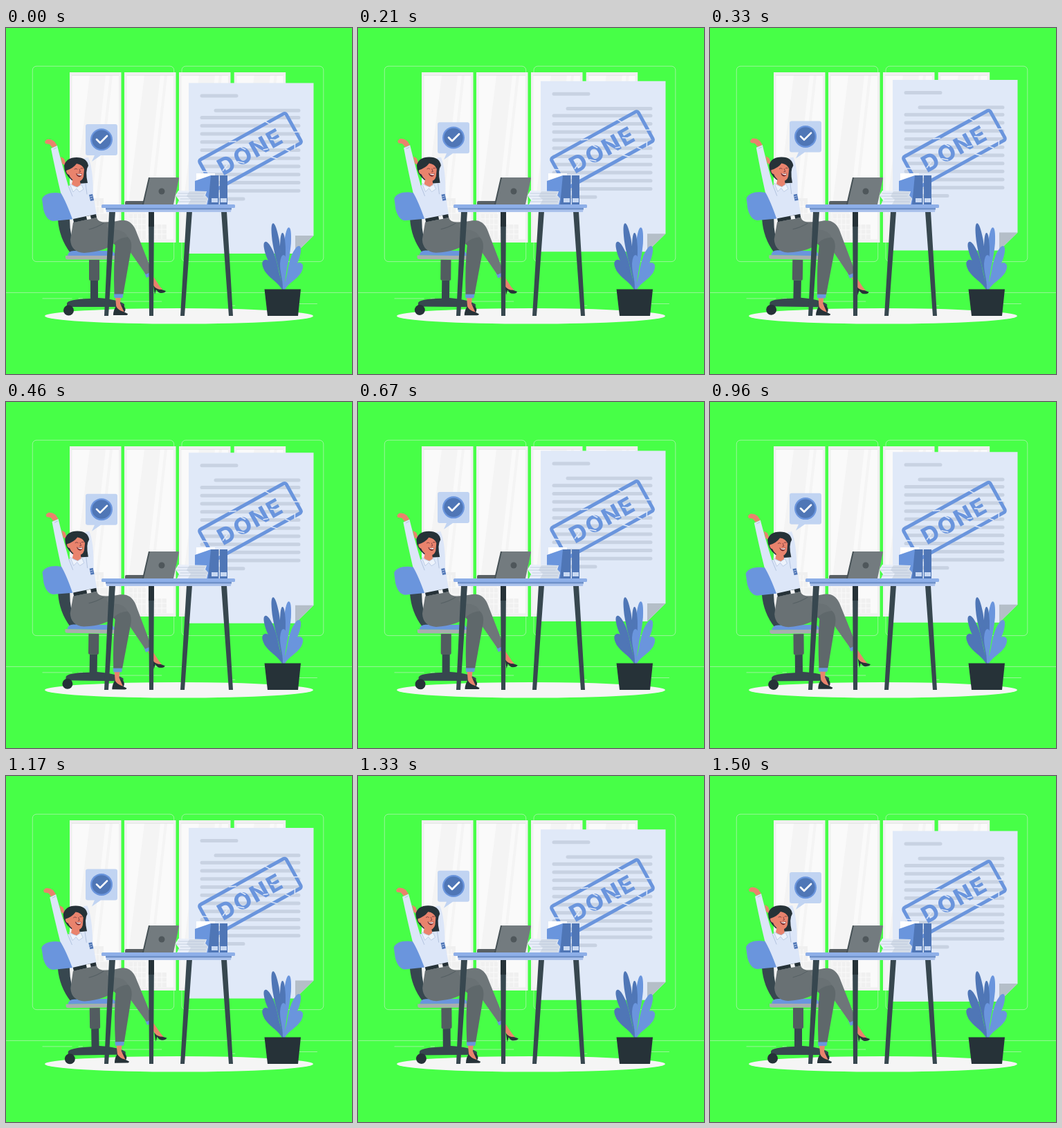
Write an HTML page that moves like this. It is 500 by 500 pixels and loops after 1540 ms.

```html
<!DOCTYPE html>
<html lang="en">
<head>
<meta charset="utf-8">
<title>Done</title>
<style>
  html, body { margin: 0; width: 100%; height: 100%; overflow: hidden; background: #47ff47; }
  svg { display: block; width: 100%; height: 100%; }
  .blue { fill: #6a95dd; }
  .navy { fill: #4f76b6; }
  .ink { fill: #263238; }
  .slate { fill: #37474f; }
  .skin { fill: #e9836d; }
  .shirt { fill: #dce6f8; }
  .line { fill: none; stroke-linecap: round; stroke-linejoin: round; }
</style>
</head>
<body>
<svg viewBox="0 0 500 500">
  <g fill="none" stroke="#ebebeb" stroke-width=".5">
    <rect x="38.3" y="55.2" width="204.4" height="282.4" rx="5.7"/>
    <rect x="254" y="55.2" width="204.8" height="282.4" rx="5.7"/>
    <path d="M0 382.4H500M416.8 398.5h33M322.5 401.2h8.7M396.6 389.2h19.2M52.5 390.9h43M104.6 390.9h6.3M131.5 395.1h93.7"/>
  </g>

  <g id="windows"></g>
  <g fill="#f0f0f0">
    <path d="M126 246h15v21h6v39h-21zM178 269h24v36h-24zM204 284h28v21h-28z"/>
    <path d="M130 250v55M135 250v55M126 258h15M126 268h20M126 278h20M126 288h20M184 269v36M190 269v36M196 269v36M178 276h24M178 284h24M178 292h24M211 284v21M218 284v21M225 284v21M204 291h28M204 298h28" stroke="#fafafa"/>
  </g>
  <ellipse cx="250" cy="416.3" rx="194" ry="11.3" fill="#f5f5f5"/>

  <g class="float">
    <path d="M264 79.5H444.500V300L418 326H264z" fill="#e0e9f8"/>
    <path d="M418 300h26.500L418 326z" fill="#b4bec8"/>
    <g id="rules" class="line" stroke="#c8d2e2" stroke-width="5"></g>
    <g transform="translate(353 178.500) rotate(-28.900)">
      <rect x="-71.500" y="-24.500" width="143" height="49" rx="3" fill="none" stroke="#6a95dd" stroke-width="5"/>
      <text class="blue" y="12" text-anchor="middle" font-family="Inter, sans-serif" font-weight="800" font-size="33" letter-spacing="2">DONE</text>
      <path class="line" stroke="#e0e9f8" stroke-width="1.500" d="M39-29l5 8M-20-27l9 4M22 21l7 7M46 22l4 5M58 28l4-7M-74-8l6 4M69 6l6 3M-48 5l9-4M-23 4l7 6M11-9l7 8M18 7l6 2M34-1l8 5M-9-12l4 6"/>
    </g>
  </g>

  <g class="float">
    <path d="M118 139h40q3 0 3 3v39q0 3-3 3H137l-13 9 4-9h-10q-3 0-3-3v-39q0-3 3-3z" fill="#c1d4f2"/>
    <circle class="blue" cx="138" cy="161.300" r="16"/>
    <circle class="navy" cx="138" cy="161.300" r="13.700"/>
    <path class="line" d="M131 161l5 5 10-10" stroke="#fff" stroke-width="2.700"/>
  </g>

  <g id="worker">
    <!-- chair -->
    <path class="slate" d="M75 277L92 275Q92 304 103 325L93 325Q77 304 75 277z"/>
    <path class="blue" d="M52 247Q56 238 72 238L91 240 99 276 68 279Q58 278 54 262z"/>
    <path d="M120 335h15v28q0 2-2 2h-11q-2 0-2-2z" fill="#525c60"/>
    <path class="slate" d="M122 365h11v25q28 2 38 9v4H88v-5q1-6 34-7z"/>
    <circle class="ink" cx="90.500" cy="408" r="7.500"/>
    <circle class="ink" cx="166" cy="407" r="6.500"/>
    <path class="blue" d="M89 329q1-7 9-7h52q7 0 8 7z"/>
    <path d="M86 329h73v3q0 2.500-3 2.500H89q-3 0-3-2.500z" fill="#a9adaf"/>
    <!-- far leg -->
    <path class="skin" d="M206 360l6-2 10 15 5 6-10-1z"/>
    <path class="ink" d="M213 372q4 6 12 6l6 2q-1 3-7 3-4 0-7-5l-2 7-1-7z"/>
    <path class="blue" d="M200 354l9-4 3 7-9 4z"/>
    <path d="M112 280Q148 282 165 278 180 276 187 291L211 352 202 356 165 303 110 320z" fill="#6e7679"/>
    <!-- near leg -->
    <path class="skin" d="M158 389h8l-1 9 6 13-11-1z"/>
    <path class="ink" d="M159 402q3 6 11 8l6 3q0 2-3 2h-18q0-7 4-13z"/>
    <path class="blue" d="M156 384h13.500l-1 6h-12z"/>
    <path d="M155 311Q160 298 170 299 183 303 181 319L169.500 384.500H156.500Q155 345 158 314z" fill="#5f686b"/>
    <path d="M97 281L131 274Q133 282 149 281 137 290 163 292 172 294 176 302 164 303 157 310 145 323 113 325 94 324 93 306z" fill="#697174"/>
    <path class="line" d="M120 291q12-3 21-9" stroke="#566064" stroke-width="1"/>
    <!-- torso and arms -->
    <path class="skin" d="M79 186l5 3 4 11-7-4z"/>
    <path class="skin" d="M67 173L74 170 70 164Q65 160 59 161L56 164 57 167 63 168z"/>
    <path class="shirt" d="M65 174L74 170Q80 194 90 228L117 223 113 188 119 187Q126 203 126 242L131 270 97 279Q87 251 79 238 72 209 65 174z"/>
    <path class="line" d="M90 228l6 15M115 225l2 15M69 175l4-2" stroke="#aebfdc" stroke-width=".9"/>
    <path class="ink" d="M97 276L130 269 131 274 98 281z"/>
    <path d="M116 272l6-1 1 5-6 1z" fill="#f4f6f8"/>
    <!-- head -->
    <path class="ink" d="M84 199Q87 187 102 187 117 187 119 199 114 206 118 224L105 225 95 220Q84 211 84 199z"/>
    <path class="skin" d="M97 216l10 5 1 8-5 2-8-5z"/>
    <path class="skin" d="M87 206Q97 203 102 196 110 197 113 204L112 215Q110 222 103 222 94 220 91 212 87 211 87 206z"/>
    <path d="M101 210q5 2 9 0-1 6-5 5-3-1-4-5z" fill="#7b2f32"/>
    <path d="M102 210.700q4 1.500 7.500 0l-.8 2q-4 1-6.700-2z" fill="#fff"/>
    <path class="line" d="M99 204q2-2 4 0M108 203q2-1 3 0M106 204l1.500 4-2 .3" stroke="#6d383b" stroke-width=".8"/>
    <path d="M92 225l5 3 6 2 6-4 3 7-6 4-4-5-5 5z" fill="#edf3fc" stroke="#aebfdc" stroke-width=".7"/>
    <path class="navy" d="M120 241l5-1 2 9-5 1z"/>
    <path d="M121 244l4-1M122 247l3-1" stroke="#dce6f8" stroke-width=".7"/>
  </g>

  <!-- desk -->
  <path class="slate" d="M149 265h9l-10 151h-6zM206 265h8l-1 151h-6zM261 265h8l-11 151h-6zM311 265h8l9 151h-6z"/>
  <path class="ink" d="M206 265h8v22h-8z"/>
  <path d="M144 259H326l-1 7H145z" fill="#abc2ec"/>
  <path d="M144 260H326v2.500H144z" fill="#6f91ca"/>
  <rect x="138" y="255" width="193" height="5" rx="1.500" fill="#8eafe8"/>
  <!-- laptop -->
  <path d="M172 252q0-2 2-2h26v5h-28z" fill="#596064"/>
  <path d="M206 216h4l-9 39h-4z" fill="#455055"/>
  <path d="M208 216h41q1 0 1 1l-8 38h-43z" fill="#737b7f"/>
  <circle cx="225" cy="236" r="4.500" fill="#4f575b"/>
  <!-- papers and binders -->
  <path d="M275 210h27v12h-27z" fill="#fff"/>
  <path class="blue" d="M273 221L296 213V255H273z"/>
  <path class="navy" d="M296 213h11.500v42H292zM309 213h11v42h-11z"/>
  <path d="M297 246h9v6h-9zM310 246h9v6h-9z" fill="#c8d8f2"/>
  <path d="M249 235l41 1-2 6 4 5-2 8h-43l3-6-5-7z" fill="#e9eff9"/>
  <path d="M265 236h25l-3 5 5 5-3 9h-26l4-7-6-5z" fill="#d3dce8"/>
  <path class="line" d="M249 239h38M246 243h39M252 247h38M248 251h40" stroke="#b9c6d8" stroke-width=".8"/>

  <g id="plant" transform="translate(401 378)"></g>
  <path class="ink" d="M373.500 377.500h52.500l-4 38.500h-44z"/>
</svg>
<script>
  const byId = id => document.getElementById(id);

  byId("windows").innerHTML = [92, 171, 250, 329.7].map(x => `
    <g transform="translate(${x} 64)">
      <path d="M0 0h74.500v246H0z" fill="#f0f0f0"/>
      <path d="M3.500 4.500h67.500v237H3.500z" fill="#fafafa"/>
      <path d="M29 4.500h23L26 241.500H3.500v-30zM58 4.500h4L36 241.500h-4z" fill="#f4f4f4"/>
      <path d="M3 4.500h68" stroke="#e2e2e2" stroke-width=".8"/>
    </g>`).join("");

  let rules = "M283 98H333M303 119.200H423";
  for (let i = 0; i < 10; i++) rules += `M283 ${129.6 + i * 11.74}H423`;
  byId("rules").innerHTML = `<path d="${rules}M283 247H343"/>`;

  const leaf = (angle, length, width, tone) => `
    <path class="${tone}" transform="rotate(${angle}) scale(${width} ${length})"
      d="M-.2 0C-.2-.35-1-.45-1-.75Q-.8-1 0-1Q.8-1 1-.75C1-.45.2-.35.2 0z"/>`;
  byId("plant").innerHTML = [
    [-9, 97, 5, "navy"], [5, 90, 5, "blue"], [-1, 82, 4, "navy"],
    [-21, 74, 6, "navy"], [20, 67, 6, "blue"],
    [-34, 51, 7.5, "navy"], [34, 46, 7.5, "blue"], [0, 50, 5, "blue"]
  ].map(args => leaf(...args)).join("");

  const LOOP = 1540, CYCLE = 1500;
  const floaters = document.querySelectorAll(".float");
  const worker = byId("worker");
  // Triangle wave: 0 at the ends of the cycle, 1 in the middle.
  const triangle = p => 1 - Math.abs(2 * p - 1);

  function draw(now) {
    const p = Math.min(now % LOOP / CYCLE, 1);
    const lift = -10 * triangle(p);
    const sway = 2 * triangle((p + 0.25) % 1) - 1;
    for (const el of floaters) el.setAttribute("transform", `translate(0 ${lift})`);
    worker.setAttribute("transform", `rotate(${sway} 141 288)`);
  }

  const start = performance.now();
  function tick() {
    draw(performance.now() - start);
    requestAnimationFrame(tick);
  }
  tick();
</script>
</body>
</html>
```
